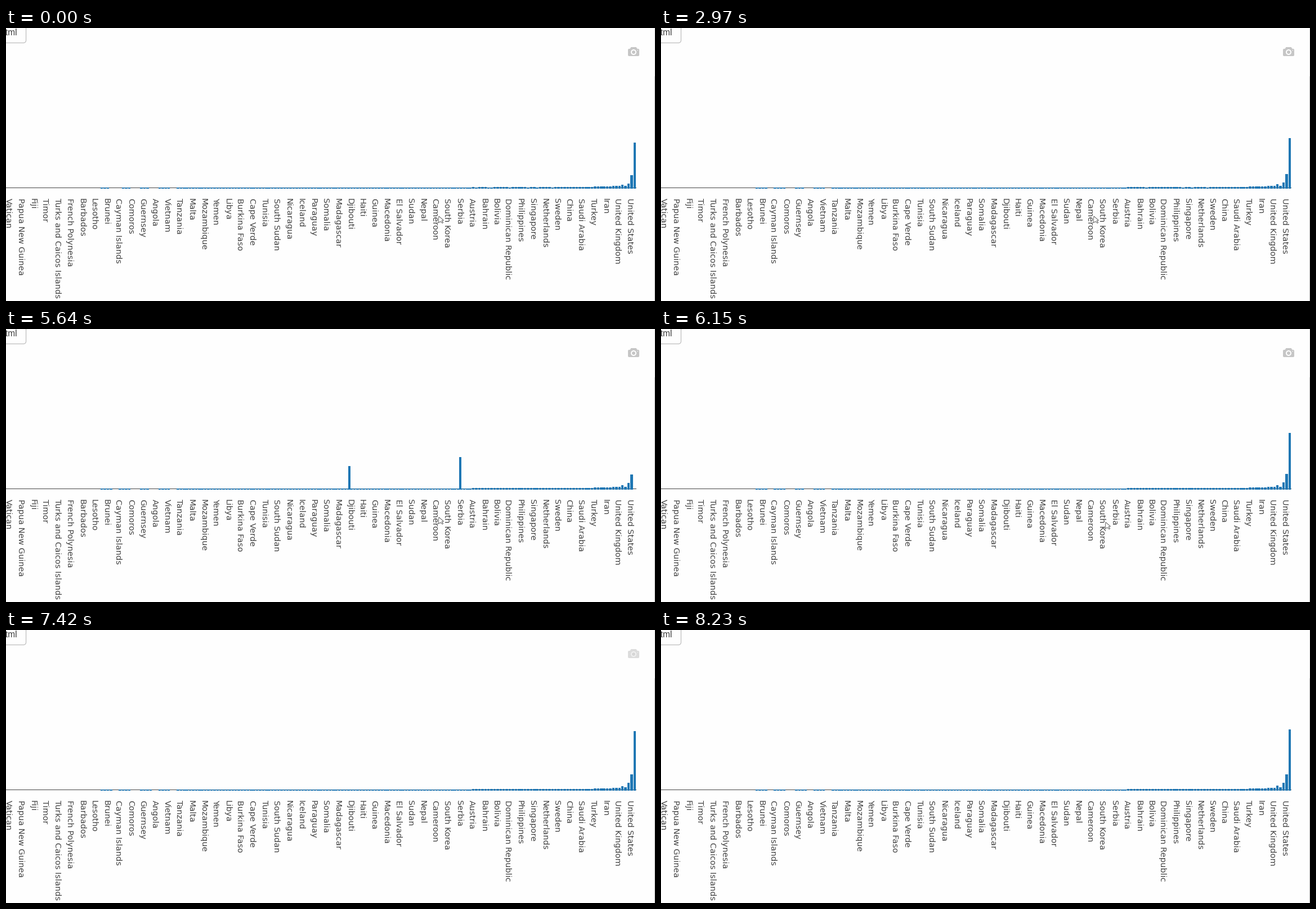
A matplotlib script for the animation above (8.33 s loop, 1153 by 486 pixels).

```python
import numpy as np
import matplotlib.pyplot as plt
from matplotlib.animation import FuncAnimation
from matplotlib.patches import Circle, FancyBboxPatch, Polygon, Rectangle

W, H, DPI = 1153, 486, 64
LOOP, INTERVAL = 8330, 70
BLUE, INK, PAPER, GREY = "#1f77b4", "#444444", "#fefefe", "#c6c6c6"
PITCH, BAR_W, LAST_X, BASE = 5.409, 4.5, 1116.8, 285.6
SWAP_START, SWAP_TIME, SWAP_SLOT = 5328, 500, 151

COUNTRIES = """Vatican,Papua New Guinea,Fiji,Timor,Turks and Caicos Islands,
French Polynesia,Barbados,Lesotho,Brunei,Cayman Islands,Comoros,Guernsey,Angola,
Vietnam,Tanzania,Malta,Mozambique,Yemen,Libya,Burkina Faso,Cape Verde,Tunisia,
South Sudan,Nicaragua,Iceland,Paraguay,Somalia,Madagascar,Djibouti,Haiti,Guinea,
Macedonia,El Salvador,Sudan,Nepal,Cameroon,South Korea,Serbia,Austria,Bahrain,
Bolivia,Dominican Republic,Philippines,Singapore,Netherlands,Sweden,China,
Saudi Arabia,Turkey,Iran,United Kingdom,United States""".replace("\n", "").split(",")

# Slots count from the right edge; the leaders grow exponentially.
LEADERS = [81.2, 23.6, 8.6, 4.2, 6.6]
GROWTH = [1.34, 1.22, 1.65, 1.3, 1.25]
FULL_ROW, STEP_ROW, SLOTS = 150, 53, 177
step_time = np.random.default_rng(4).uniform(-1.5, 0.5, STEP_ROW + 1)

fig = plt.figure(figsize=(W / DPI, H / DPI), dpi=DPI, facecolor=PAPER)
ax = fig.add_axes([0, 0, 1, 1])
ax.set(xlim=(0, W), ylim=(H, 0))
ax.axis("off")


def block(x, y, w, h, color, **kw):
    return ax.add_patch(Rectangle((x, y), w, h, color=color, lw=0, **kw))


def label(x, y, text, px, family="DejaVu Sans", **kw):
    ax.text(x, y, text, size=px * 72 / DPI, color=INK, family=family,
            va="baseline", **kw)


def draw_page():
    ax.add_patch(FancyBboxPatch((-60, -40), 95.6, 66.5, fc="none", ec="#b0b0b0",
                                lw=72 / DPI, boxstyle="round,pad=0,rounding_size=5"))
    label(20.3, 13, "html", 15.5, "Liberation Sans", ha="right")
    block(1152, 0, 1, 86, "#dddddd", aa=False)
    block(1152, 86, 1, 400, "#bdbdbd", aa=False)
    block(0, 284, 1119.5, 1, INK, zorder=1.5)
    for i, name in enumerate(reversed(COUNTRIES)):
        label(1103.8 - i * 4 * PITCH, 303, name, 14.45, rotation=270,
              rotation_mode="anchor", ha="left")


def draw_camera():
    shapes = [
        FancyBboxPatch((1105, 37), 20, 13, color=GREY, lw=0,
                       boxstyle="round,pad=0,rounding_size=2"),
        Polygon([(1108.5, 37), (1110.5, 34), (1119.5, 34), (1121.5, 37)],
                color=GREY, lw=0),
        Circle((1115, 43), 5, color=PAPER, lw=0),
        Circle((1115, 43), 3, color=GREY, lw=0),
        Circle((1122.3, 39.7), 0.7, color=PAPER, lw=0),
    ]
    return [ax.add_patch(shape) for shape in shapes]


def slot_x(k):
    return LAST_X - k * PITCH


def slot_height(k, u):
    """Bar height in slot k at the fraction u of the loop."""
    if k < len(LEADERS):
        return LEADERS[k] * GROWTH[k] ** u
    if k <= STEP_ROW:
        late = k > STEP_ROW // 2 and u < step_time[k]
        return 1.6 if late else max(2.6, 4.6 - 0.18 * (k - 5))
    if k <= FULL_ROW:
        return 1.6
    # Sparse tail: short runs of dashes that widen with time.
    wave = np.cos(2 * np.pi * (k - 154.5) / 6.4)
    return 1.6 if wave > -0.35 * u else 0


def ease(u, power):
    if u < 0.5:
        return (2 * u) ** power / 2
    return 1 - (2 * (1 - u)) ** power / 2


def place(bar, x, height):
    bar.set_bounds(x - BAR_W / 2, BASE - height, BAR_W, height)


draw_page()
camera = draw_camera()
bars = [block(0, 0, 0, 0, BLUE, zorder=2) for _ in range(SLOTS)]
ARROW = np.array([(1, 0), (0, 12), (3.5, 9.5), (7.5, 12.5), (8.7, 11),
                  (5.8, 8.3), (9.5, 7.5)])
cursor = ax.add_patch(Polygon(ARROW, fc="white", ec="#555555",
                              lw=0.9 * 72 / DPI, zorder=5))


def update(frame):
    t = frame * INTERVAL
    for k, bar in enumerate(bars):
        place(bar, slot_x(k), slot_height(k, t / LOOP))

    # The tallest bar and a tiny one trade places.
    swap = (t - SWAP_START) / SWAP_TIME
    if 0 < swap < 1:
        shift = ease(swap, 3) * SWAP_SLOT * PITCH
        rise = ease(swap, 2) * slot_height(0, t / LOOP)
        place(bars[0], LAST_X - shift, slot_height(0, t / LOOP) - rise)
        place(bars[SWAP_SLOT], slot_x(SWAP_SLOT) + shift, rise)

    times = [5760, 6500, 6760, 7300]
    cursor.set_xy(ARROW + (np.interp(t, times, [768, 815, 815, 850]),
                           np.interp(t, times, [335, 355, 355, 500])))
    for part in camera:
        part.set_alpha(np.interp(t, [7300, 7600], [1, 0]))
    return [*bars, cursor, *camera]


anim = FuncAnimation(fig, update, frames=LOOP // INTERVAL, interval=INTERVAL,
                     repeat=True, repeat_delay=0)
plt.show()
```
